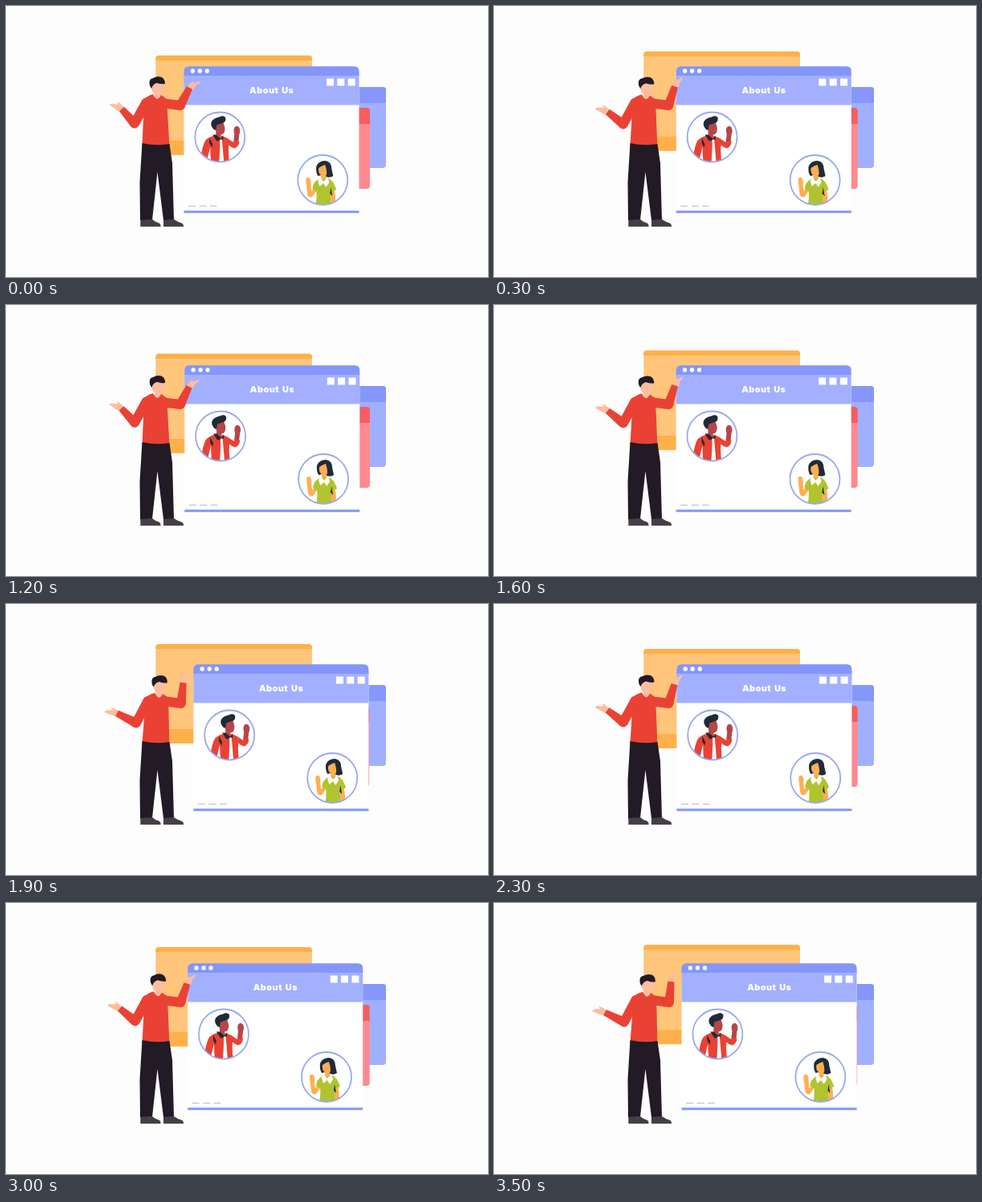
Recreate the animation shown at these times as an HTML page. Size 600 by 338 pixels, loop 3.6 s.

```html
<!DOCTYPE html>
<html lang="en">
<head>
<meta charset="utf-8">
<title>About Us</title>
<style>
  html, body { margin: 0; width: 100%; height: 100%; overflow: hidden; background: #fefdfe; }
  svg { display: block; width: 600px; height: 338px; }
  .title {
    font: 900 10.9px Inter, "Liberation Sans", sans-serif;
    letter-spacing: .45px; word-spacing: 1.3px;
    fill: #fff; text-anchor: middle;
  }
  .upper { fill: none; stroke: #e94235; stroke-width: 12; stroke-linecap: round; }
  .skin { fill: #ffbd9f; }
  .shirt { fill: #e94235; }
  .dark { fill: #221a25; }
  .ring { fill: none; stroke: #9aa9ee; stroke-width: 1.8; }
</style>
</head>
<body>
<svg viewBox="0 0 600 338">
  <defs>
    <clipPath id="disc"><circle r="31"/></clipPath>
    <clipPath id="round"><rect x="186.300" y="61.800" width="194.700" height="124" rx="4"/></clipPath>
  </defs>

  <g id="yellow">
    <g clip-path="url(#round)">
      <path fill="#ffc57b" d="M186 61h196v125h-196z"/>
      <path fill="#ffb04a" d="M186 61h196v7h-196zM186 168h196v18h-196z"/>
    </g>
  </g>

  <path fill="#a1afff" d="M400 101h69q4 0 4 4v93q0 4-4 4h-69z"/>
  <path fill="#8697fb" d="M400 101h69q4 0 4 4v16h-73z"/>

  <g id="red">
    <path fill="#ff898e" d="M400 127h49q4 0 4 4v93q0 4-4 4h-49z"/>
    <path fill="#f45d61" d="M400 127h49q4 0 4 4v16h-53z"/>
  </g>

  <g id="page">
    <path fill="#fff" d="M221.500 100h218v157h-218z"/>
    <path fill="#a2b0ff" d="M221.500 85h218v38.500h-218z"/>
    <path fill="#8496fa" d="M221.500 87v-5.500q0-6.200 6.200-6.200h205.600q6.200 0 6.200 6.200v5.500z"/>
    <path fill="#8496fa" d="M221.500 255.200h218v3h-218z"/>
    <g fill="#fff">
      <circle cx="232.300" cy="81" r="2.700"/>
      <circle cx="241.300" cy="81" r="2.700"/>
      <circle cx="250.300" cy="81" r="2.700"/>
      <path d="M399 90.500h9v9h-9zM412.300 90.500h9v9h-9zM425.700 90.500h9v9h-9z"/>
    </g>
    <text class="title" x="330.700" y="109">About Us</text>
    <path stroke="#a9b9cc" d="M227 249.700h9M240.500 249.700h9M254 249.700h8.500"/>

    <g transform="translate(266.300 163.500)">
      <circle r="31" fill="#fff"/>
      <g clip-path="url(#disc)">
        <path fill="#b5464a" d="M-6-16 4-18Q7-12 6-8Q5-3 1-3L2 2-5 0V-6zM18-4Q16-10 19-13Q22-15 24-12Q26-8 24-3L23 7 17 6z"/>
        <path class="shirt" d="M-7-2 4-1Q10 1 16 6L24 5Q24 12 18 14Q14 13 11 10Q10 20 12 32H-11Q-12 22-12 12L-17 32H-25Q-22 10-18 4Q-14 0-7-2z"/>
        <path fill="#202b38" d="M-7-9Q-13-15-10-20Q-7-24-1-25Q5-28 7-24Q8-18 2-17L-4-15-5-9zM-9-3-5-3 1 2 4-2 4 3 0 4-4 5zM-13 1-9 9-10 13-13 8z"/>
        <path fill="#fff" d="M0 3 2.500 3 3.500 14 5 32H-1L0 14z"/>
      </g>
      <circle class="ring" r="31"/>
    </g>

    <g transform="translate(394.300 217)">
      <circle r="31" fill="#fff"/>
      <g clip-path="url(#disc)">
        <path fill="#202b38" d="M-6-5Q-9-10-8-17Q-5-24 3-24Q11-23 11-14L13-5Q9-2 4-4L-2-6z"/>
        <path fill="#ffae52" d="M-5-15Q-1-18 3-19Q5-13 5-8L4-5 5 1-2 3-2-6Q-6-8-5-15zM-21 1Q-21-4-17-3Q-14-1-15 5L-14 14-11 10-8 14-13 21Q-17 23-19 18zM10 11 14 10Q17 22 15 32H10z"/>
        <path fill="#b1c42f" d="M-5-1 7-2Q13 0 17 12L11 15Q9 22 11 32H-9Q-7 22-8 14L-13 11Q-12 2-5-1z"/>
        <path fill="#fff" d="M-3-3 1 2 6-4 8 3 4 9 1 4-4 8-6 1z"/>
        <path fill="#202b38" d="M10 9 12 20 9 17z"/>
      </g>
      <circle class="ring" r="31"/>
    </g>
  </g>

  <g id="lean">
    <path class="skin" d="M181 95Q180 107 185 110L184 116Q188 120 193 116V113Q197 108 196 94z"/>
    <path class="dark" d="M181 103Q178 99 178.500 95Q179 90.500 183 90Q188 87 193 88.500Q198 90.500 198 97Q193 98 188 96Q183 97 181 103z"/>
    <path class="shirt" d="M183 110Q188 121 193 111L200 116 201 132 203.500 175H169.500L171 138 169 119Q175 112 183 110z"/>
  </g>
  <path class="dark" d="M169.500 171Q186 175 203.500 172L207 196 209 267H196L188.500 207 182 267H167L166.500 220z"/>
  <path fill="#443e47" d="M167.300 275.300V267L182 266Q185 269 190 270.500Q193 272 192.500 275.300zM196 275.300V267L209 266Q213 269 218 270.500Q221.500 272 221 275.300z"/>

  <path class="skin" id="leftHand" d="M2 4Q-3 4-8 0L-15-5Q-14-8-7-6L-4-6-6-9Q-3-9 0-5L4-1z"/>
  <path class="skin" id="rightHand" d="M-3 2Q-2-4 1-6L4-8 5-6 13-8Q14-6 8-3L4 3z"/>
  <path class="upper" id="leftUpper"/>
  <path class="shirt" id="leftFore"/>
  <path class="upper" id="rightUpper"/>
  <path class="shirt" id="rightFore"/>
</svg>
<script>
  const LOOP = 3600, STEP = 100;
  const el = id => document.getElementById(id);
  const move = (id, value) => el(id).setAttribute("transform", value);
  const lerp = (a, b, u) => a + (b - a) * u;

  // Times at which a swing turns round, starting from rest.
  const pageTurns = [0, 650, 1310, 1950, 2640, 3480, 4200];
  const yellowTurns = [0, 660, 1320, 1940, 2640, 3300, 3960];

  function swing(turns, t) {
    const i = turns.findIndex((_, k) => t < turns[k + 1]);
    const p = (t - turns[i]) / (turns[i + 1] - turns[i]);
    const ease = (1 - Math.cos(Math.PI * p)) / 2;
    return i % 2 ? 1 - ease : ease;
  }

  // Shoulder, elbow and wrist, each as x0, y0, x1, y1.
  const arms = {
    left: [[174.500, 120.500, 176.500, 121], [160, 146.500, 162, 148.500], [144, 128.500, 138, 136.500]],
    right: [[196, 121.500, 200, 121.500], [217, 124, 218, 124], [228.500, 102, 220.500, 98]]
  };

  // Sleeve that narrows from a to b.
  function taper(a, b, wide, narrow) {
    const dx = b[0] - a[0], dy = b[1] - a[1], len = Math.hypot(dx, dy);
    const side = ([x, y], w) => [x - dy / len * w / 2, y + dx / len * w / 2];
    return `M${side(a, wide)}L${side(b, narrow)}L${side(b, -narrow)}L${side(a, -wide)}z`;
  }

  function drawArm(side, u, turn) {
    const [s, e, w] = arms[side].map(([x0, y0, x1, y1]) => [lerp(x0, x1, u), lerp(y0, y1, u)]);
    el(side + "Upper").setAttribute("d", `M${s}L${e}`);
    el(side + "Fore").setAttribute("d", taper(e, w, 12, 8));
    move(side + "Hand", `translate(${w}) rotate(${turn})`);
  }

  function draw(t) {
    const u = swing(pageTurns, t);
    move("page", `translate(${12.1 * u} 0)`);
    move("red", `translate(${-.8 * u} 0)`);
    move("yellow", `translate(0 ${-12 * swing(yellowTurns, t)})`);
    move("lean", `translate(0 ${.8 * u}) rotate(${2.2 * u} 187 172)`);
    drawArm("left", u, -14 * u);
    drawArm("right", u, -42 * u);
  }

  const start = performance.now();
  function tick() {
    const t = Math.max(0, performance.now() - start) + 1;
    draw(Math.floor(t % LOOP / STEP) * STEP);
    requestAnimationFrame(tick);
  }
  tick();
</script>
</body>
</html>
```
